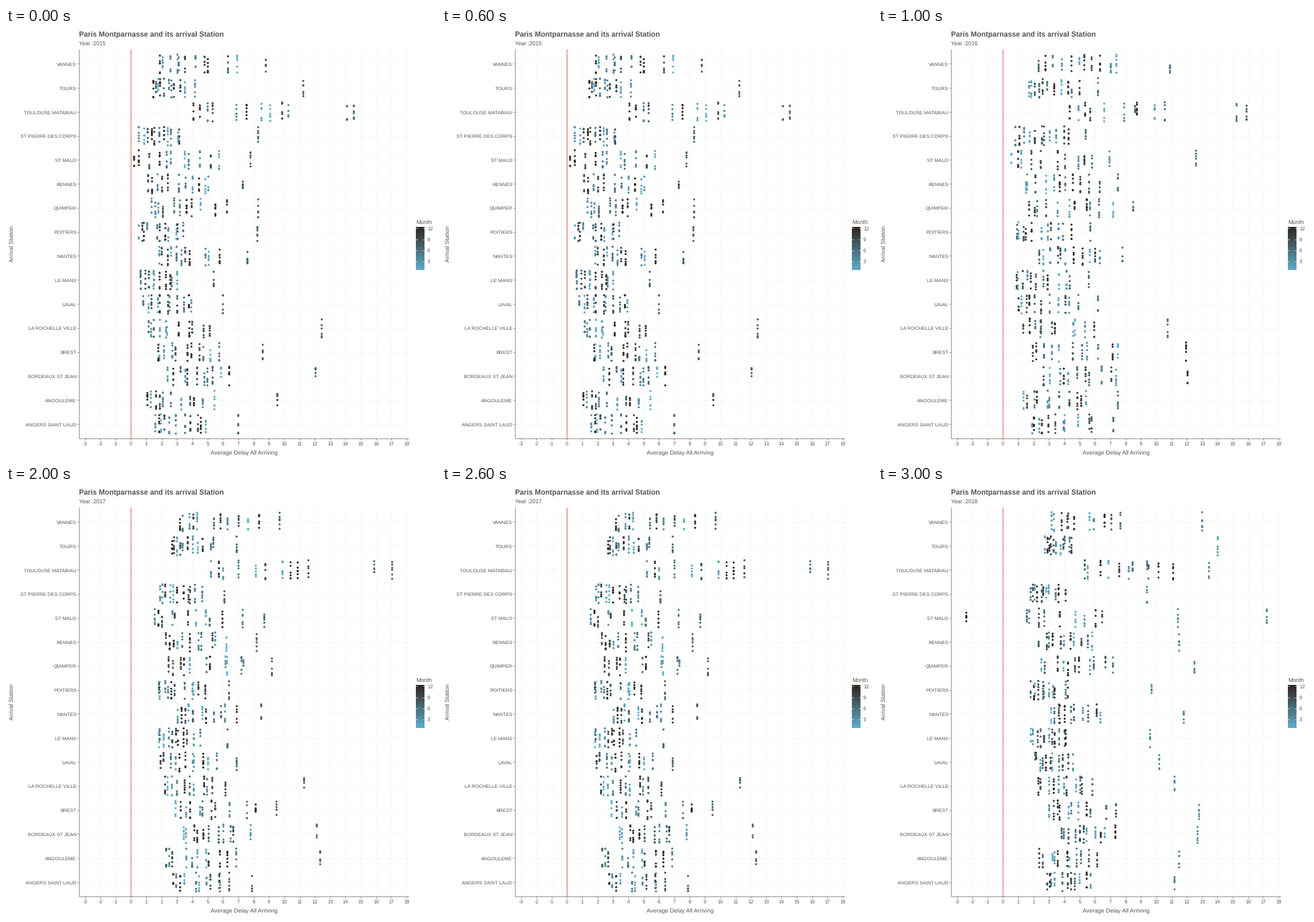
A matplotlib script for the animation above (4 s loop, 748x748 px).

```python
import numpy as np
import matplotlib.pyplot as plt
from matplotlib.animation import FuncAnimation
from matplotlib.colors import LinearSegmentedColormap

SIZE, DPI = 748, 100
PX = 72 / DPI                      # one pixel in points
LEFT, RIGHT, TOP, BOTTOM = 127.5, 701.5, 36.5, 713.5
TEXT, AXIS, GRID, ZERO = "#555555", "#8c8278", "#eeeeea", "#e04545"
CAUSES = 6                         # dots per monthly delay
MONTHS = LinearSegmentedColormap.from_list("months", ["#5fadc8", "#32251e"])

plt.rcParams["font.family"] = "Liberation Sans"
plt.rcParams["text.hinting"] = "none"

# Usual range of the monthly delays at each station
STATIONS = {
    "VANNES": (2.5, 7.8), "TOURS": (2.1, 5.0),
    "TOULOUSE MATABIAU": (4.6, 11.5), "ST PIERRE DES CORPS": (1.2, 4.2),
    "ST MALO": (0.9, 6.8), "RENNES": (1.7, 6.3),
    "QUIMPER": (1.9, 7.3), "POITIERS": (1.2, 4.5),
    "NANTES": (2.5, 6.6), "LE MANS": (1.2, 4.4),
    "LAVAL": (1.4, 5.0), "LA ROCHELLE VILLE": (1.7, 6.0),
    "BREST": (2.3, 7.6), "BORDEAUX ST JEAN": (2.9, 7.5),
    "ANGOULEME": (1.7, 6.3), "ANGERS SAINT LAUD": (2.2, 6.0),
}

# Per year: shift of the range, worst month and how far it exceeds the range,
# then the few striking delays as {station: {month: delay}}
YEARS = {
    2015: ((-0.7, -0.8), 7, 1.8, {
        "TOURS": {7: 11.25}, "TOULOUSE MATABIAU": {6: 14.1, 7: 14.55},
        "ST PIERRE DES CORPS": {7: 8.3}, "POITIERS": {7: 8.25},
        "LA ROCHELLE VILLE": {7: 12.45}, "BORDEAUX ST JEAN": {7: 12.05},
        "ANGOULEME": {8: 9.55}}),
    2016: ((-0.4, 0.2), 6, 1.0, {
        "VANNES": {6: 10.9}, "TOULOUSE MATABIAU": {5: 15.25, 8: 15.9},
        "ST MALO": {6: 12.6}, "LA ROCHELLE VILLE": {6: 10.75},
        "BREST": {12: 11.95}, "BORDEAUX ST JEAN": {11: 12.05}}),
    2017: ((0.5, 0.6), 7, 1.3, {
        "TOULOUSE MATABIAU": {6: 15.88, 7: 17.05},
        "LA ROCHELLE VILLE": {7: 11.3}, "BORDEAUX ST JEAN": {6: 12.13},
        "ANGOULEME": {7: 12.35}}),
    2018: ((0.6, -0.1), 4, 5.3, {
        "TOURS": {3: 14.02}, "TOULOUSE MATABIAU": {4: 13.45},
        "ST MALO": {5: 17.22, 4: 11.42, 12: -2.4}}),
}


def x_pos(delay):
    return 217.5 + 26.64 * delay


def y_pos(row):
    return 62.3 + 41.77 * row


def monthly_delays(rng, station, year):
    """Twelve delays, denser towards the low end, with the year's peaks."""
    shift, worst, excess, striking = YEARS[year]
    low, high = np.add(STATIONS[station], shift)
    steps = (np.arange(12) + rng.uniform(0, 1, 12)) / 12
    delays = low + (high - low) * rng.permutation(steps) ** 1.3
    for month, delay in striking.get(station, {worst: high + excess}).items():
        delays[month - 1] = delay
    return delays


def year_dots(year):
    """Positions and colours of one year's dots, jittered within rows."""
    rng = np.random.default_rng(year)
    delays = np.array([monthly_delays(rng, name, year) for name in STATIONS])
    row, month, _ = np.indices((*delays.shape, CAUSES)).reshape(3, -1)
    jitter = rng.uniform(-0.4, 0.4, row.size)
    points = np.column_stack([x_pos(delays[row, month]), y_pos(row + jitter)])
    order = rng.permutation(row.size)
    return points[order], MONTHS(month[order] / 11)


fig = plt.figure(figsize=(SIZE / DPI, SIZE / DPI), dpi=DPI, facecolor="white")
ax = fig.add_axes([0, 0, 1, 1])
ax.axis("off")


def line(xs, ys, color, z=1, width=1, **style):
    ax.plot(xs, ys, color=color, lw=width * PX, zorder=z,
            solid_capstyle="butt", **style)


def label(x, y, text, size, **style):
    return ax.text(x, y, text, fontsize=size * PX, color=TEXT,
                   **{"va": "baseline", **style})


dashes = {"dashes": (4, 4), "dash_capstyle": "butt"}
for value in range(-3, 19):
    x = x_pos(value)
    line([x, x], [BOTTOM, TOP], GRID, **dashes)
    line([x, x], [BOTTOM, BOTTOM + 3], AXIS)
    label(x, 725.7, str(value), 8.6, ha="center")
for row, name in enumerate(STATIONS):
    y = y_pos(row)
    line([LEFT, RIGHT], [y, y], GRID, **dashes)
    line([LEFT - 3, LEFT], [y, y], AXIS)
    label(122.5, y + 3.6, name, 8.5, ha="right")

line([LEFT, LEFT], [TOP, BOTTOM], AXIS, z=4)
line([LEFT, RIGHT], [BOTTOM, BOTTOM], AXIS, z=4)
line([x_pos(0)] * 2, [TOP, BOTTOM], ZERO, z=3)

label(127, 15, "Paris Montparnasse and its arrival Station", 12.6, weight="bold")
subtitle = label(127, 30.5, "", 9.7)
label(414.5, 741.5, "Average Delay All Arriving", 10.15, ha="center")
label(10.5, 375, "Arrival Station", 10.15, rotation=90, ha="center", va="center")

# Colour bar
label(713, 340.5, "Month", 9.9)
ax.imshow(np.linspace(1, 0, 75)[:, None], cmap=MONTHS, aspect="auto",
          extent=(713, 728, 421, 346), vmin=0, vmax=1, zorder=2)
for month in (3, 6, 9, 12):
    y = 348.3 + (12 - month) * 6.42
    for start in (713, 725):
        line([start, start + 3], [y, y], "white", z=3, width=0.8)
    label(733, y + 3.2, str(month), 8.6)

ax.set(xlim=(0, SIZE), ylim=(SIZE, 0))
dots = ax.scatter([], [], s=(3.6 * PX) ** 2, linewidths=0, zorder=2)


def draw(index):
    year = list(YEARS)[index]
    points, colors = year_dots(year)
    dots.set_offsets(points)
    dots.set_facecolors(colors)
    subtitle.set_text(f"Year :{year}")
    return dots, subtitle


animation = FuncAnimation(fig, draw, frames=len(YEARS), interval=1000,
                          repeat=True, repeat_delay=0)
plt.show()
```
